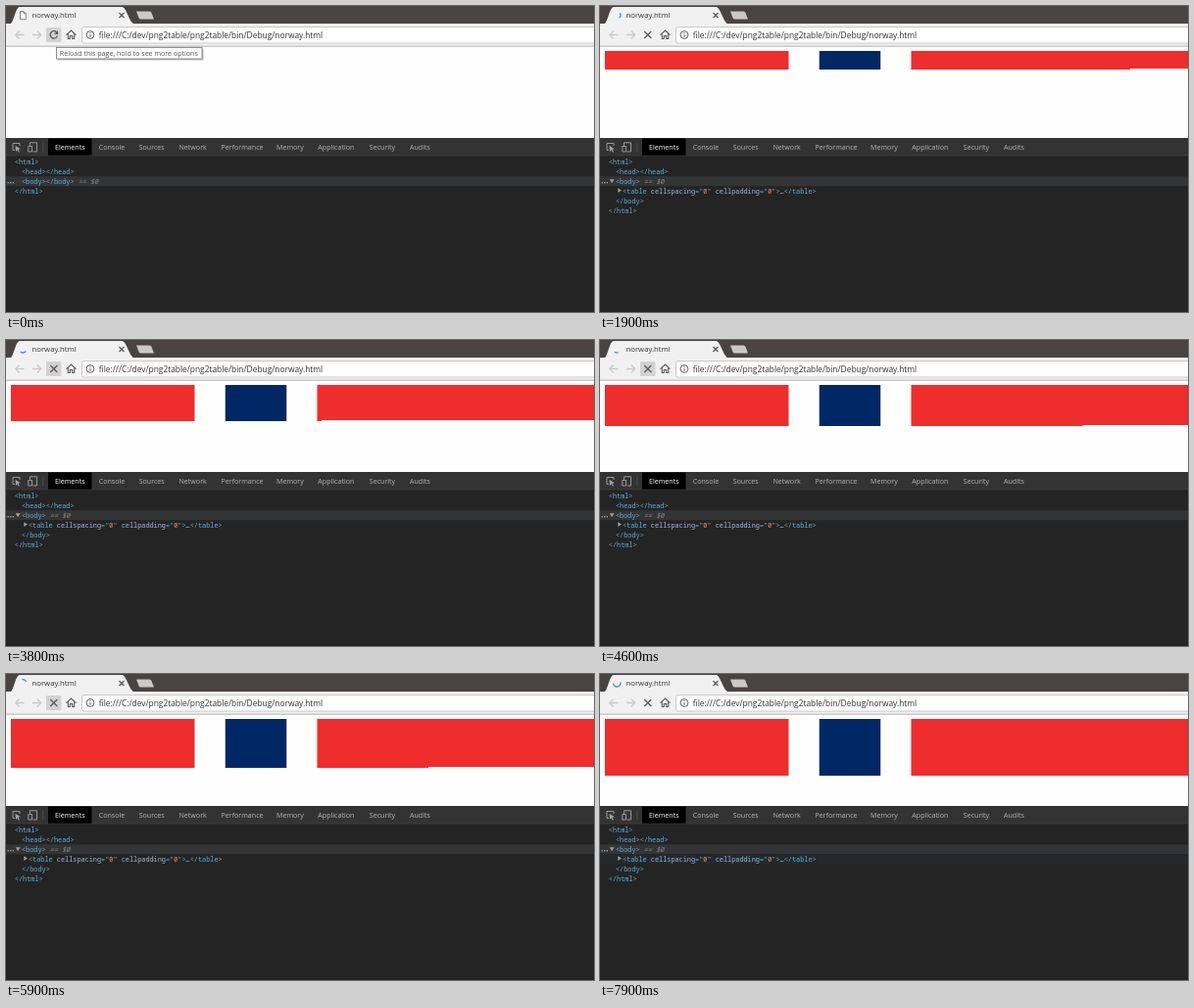
These frames come from a looping animation (600x313 px, 8 s). An HTML page:

```html
<!DOCTYPE html>
<html lang="en">
<head>
<meta charset="utf-8">
<title>Table loading in a browser</title>
<style>
  html, body { margin: 0; width: 100%; height: 100%; overflow: hidden; background: #242424; }
  svg { display: block; width: 100vw; height: 100vh; }
  text { white-space: pre; }
  .ui { font-family: "Open Sans", "Noto Sans", sans-serif; }
  .tabs { font-size: 7.1px; fill: #b4b4b4; }
  .code { font-family: "Noto Sans Mono", "DejaVu Sans Mono", monospace; font-size: 6.875px; fill: #5db0d7; }
  .attr { fill: #9bbbdc; }
  .value { fill: #f28b66; }
  .ref { fill: #8c8c8c; font-style: italic; }
  .line { fill: none; stroke: #5a5a5a; stroke-width: 1.3; }
  .faint { stroke: #cbcbcb; }
  .tool { fill: none; stroke: #a5a5a5; stroke-width: .9; }
</style>
</head>
<body>
<svg viewBox="0 0 600 313" preserveAspectRatio="none">
  <defs>
    <clipPath id="painted"><path id="paintedArea" d=""/></clipPath>
  </defs>

  <!-- Tab strip -->
  <rect width="600" height="19" fill="#494442"/>
  <path d="M4 18.5C8 17.5 9 3 13.500 1H119C123.500 3 126 17.500 131 18.500Z" fill="#f2f1f2"/>
  <path d="M133 5.500H146.500Q148 5.500 148.500 7L151 13.500H137.500Q136 13.500 135.500 12Z" fill="#cbc8c7"/>
  <path d="M115.500 7L120.500 12M120.500 7L115.500 12" class="line" stroke-width="1"/>
  <text class="ui" x="26.500" y="12.200" font-size="7.75" fill="#333">norway.html</text>
  <path id="pageIcon" d="M14.500 5.500H18L20.300 7.800V13.700H14.500ZM18 5.500V7.800H20.300" fill="#fff" stroke="#666" stroke-width=".8"/>
  <path id="spinner" fill="none" stroke-width="1.3"/>

  <!-- Toolbar -->
  <rect y="18" width="600" height="23" fill="#f2f1f2"/>
  <rect y="40.500" width="600" height=".8" fill="#c4c3c4"/>
  <path d="M18.500 29.500H10M13.700 25.500L9.700 29.500L13.700 33.500" class="line faint"/>
  <path d="M27 29.500H35.500M31.800 25.500L35.800 29.500L31.800 33.500" class="line faint"/>
  <rect id="hover" x="41" y="22" width="15.500" height="15" rx="1.500" fill="#d3d2d3"/>
  <g id="reloadIcon">
    <path d="M51.600 26.800A3.700 3.700 0 1 0 52.400 30.500" class="line"/>
    <path d="M53 25V29H49Z" fill="#5a5a5a"/>
  </g>
  <path id="stopIcon" d="M45.300 26L52.300 33M52.300 26L45.300 33" class="line"/>
  <path d="M61.500 29.700L66.500 25L71.500 29.700M63.300 28.500V33.500H65.300V30.500H67.700V33.500H69.700V28.500" class="line" style="stroke-width:1.1"/>
  <rect x="77.500" y="21.500" width="530" height="16.500" rx="2" fill="#fff" stroke="#c6c5c6" stroke-width=".9"/>
  <circle cx="86" cy="29.500" r="3.900" class="line" style="stroke-width:1"/>
  <path d="M86 29V31.700M86 27V28" class="line" style="stroke-width:1"/>
  <text class="ui" x="94.800" y="32.500" font-size="8.4" fill="#333">file:///C:/dev/png2table/png2table/bin/Debug/norway.html</text>

  <!-- Page -->
  <rect y="41.300" width="600" height="94" fill="#fefefe"/>
  <g clip-path="url(#painted)">
    <rect x="5" y="46" width="187.500" height="88" fill="#ee2d2c"/>
    <rect x="223.750" y="46" width="62.500" height="88" fill="#002864"/>
    <rect x="317.500" y="46" width="374.500" height="88" fill="#ee2d2c"/>
  </g>
  <g id="tooltip">
    <rect x="52.500" y="43.500" width="149" height="12" fill="#000" opacity=".25"/>
    <rect x="51.500" y="42.500" width="148.500" height="11.500" fill="#fff" stroke="#777" stroke-width=".8"/>
    <text class="ui" x="54.800" y="51" font-size="7.1" fill="#575757">Reload this page, hold to see more options</text>
  </g>

  <!-- Developer tools -->
  <rect y="135" width="600" height="178" fill="#242424"/>
  <rect y="135" width="600" height="18" fill="#333"/>
  <rect y="152.600" width="600" height=".7" fill="#3f3f3f"/>
  <rect x="43" y="135.500" width="44.500" height="17.200" fill="#000"/>
  <path d="M9 147.500H7V140.500H14V143" class="tool"/>
  <path d="M9.500 142.800L14.800 146.300L12.500 146.800L14 149.300L12.900 149.800L11.600 147.300L10 149Z" fill="#a5a5a5"/>
  <path d="M24.500 143V139.800H31.500V149H27.500M22.800 143.500H26.500V149H22.800Z" class="tool"/>
  <path d="M37.800 139.500V149.500" class="tool" style="stroke:#505050"/>
  <g class="ui tabs">
    <text x="50" y="147.300" fill="#fff">Elements</text>
    <text x="94.700" y="147.300">Console</text>
    <text x="135.700" y="147.300">Sources</text>
    <text x="176.500" y="147.300">Network</text>
    <text x="219.500" y="147.300">Performance</text>
    <text x="276" y="147.300">Memory</text>
    <text x="318.300" y="147.300">Application</text>
    <text x="370.800" y="147.300">Security</text>
    <text x="412" y="147.300">Audits</text>
  </g>

  <!-- Element tree -->
  <rect y="174.300" width="600" height="9.900" fill="#333435"/>
  <rect id="rowHover" y="184.200" width="600" height="10" fill="#23292d"/>
  <g fill="#b5b5b5"><circle cx="2.200" cy="180.700" r=".75"/><circle cx="4.800" cy="180.700" r=".75"/><circle cx="7.400" cy="180.700" r=".75"/></g>
  <g class="code">
    <text x="8.800" y="161.700">&lt;html&gt;</text>
    <text x="16" y="171.700">&lt;head&gt;&lt;/head&gt;</text>
    <g id="emptyTree">
      <text x="16" y="181.700">&lt;body&gt;&lt;/body&gt;<tspan class="ref"> == $0</tspan></text>
      <text x="8.800" y="191.700">&lt;/html&gt;</text>
    </g>
    <g id="tableTree">
      <path d="M9.800 177.300H14.600L12.200 181.300Z" fill="#a0a0a0"/>
      <text x="16" y="181.700">&lt;body&gt;<tspan class="ref"> == $0</tspan></text>
      <path d="M18.300 186.200L22 188.600L18.300 191Z" fill="#a0a0a0"/>
      <text x="23" y="191.700">&lt;table <tspan class="attr">cellspacing</tspan>="<tspan class="value">0</tspan>" <tspan class="attr">cellpadding</tspan>="<tspan class="value">0</tspan>"&gt;<tspan fill="#ddd">…</tspan>&lt;/table&gt;</text>
      <text x="16" y="201.700">&lt;/body&gt;</text>
      <text x="8.800" y="211.700">&lt;/html&gt;</text>
    </g>
  </g>
</svg>
<script>
const LOOP = 8000, STEP = 100;
const CLICK = 900, COMMIT = 1600;
const ARC_TIME = 2000 / 3, MAX_ARC = 270, SPIN_OFFSET = -20;
const TABLE = { x: 5, y: 46, width: 687 };

// [time, rows painted]; each row costs more than the one before it
const PROGRESS = [[1600, 14.1], [1900, 18.78], [2900, 29.46], [4600, 41.71],
                  [5900, 49.62], [6900, 55.15], [7900, 57.92]];

const el = id => document.getElementById(id);
const show = (id, on) => el(id).setAttribute("visibility", on ? "visible" : "hidden");

function rowsAt(t) {
  if (t < COMMIT) return 0;
  const i = Math.max(1, PROGRESS.findIndex(([time]) => time >= t));
  const [t0, r0] = PROGRESS[i - 1], [t1, r1] = PROGRESS[i];
  return Math.sqrt(r0 * r0 + (r1 * r1 - r0 * r0) * (t - t0) / (t1 - t0));
}

// cubic-bezier(.4, 0, .2, 1)
function ease(x) {
  let lo = 0, hi = 1;
  for (let i = 0; i < 24; i++) {
    const s = (lo + hi) / 2, u = 1 - s;
    if (1.2 * u * u * s + 0.6 * u * s * s + s ** 3 < x) lo = s; else hi = s;
  }
  return lo * lo * (3 - 2 * lo);
}

function arc(start, sweep) {
  const cx = 17.3, cy = 9.3, r = 3.7;
  const point = deg => {
    const a = deg * Math.PI / 180;
    return `${(cx + r * Math.cos(a)).toFixed(2)} ${(cy + r * Math.sin(a)).toFixed(2)}`;
  };
  return `M${point(start)}A${r} ${r} 0 ${+(Math.abs(sweep) > 180)} ${+(sweep > 0)} ${point(start + sweep)}`;
}

function drawSpinner(t) {
  const spinner = el("spinner"), elapsed = t - COMMIT;
  if (elapsed < 0) {
    spinner.setAttribute("stroke", "#8a8a8a");
    spinner.setAttribute("d", arc(SPIN_OFFSET - 360 * elapsed / 1320, 179));
    return;
  }
  const phase = elapsed / ARC_TIME, half = Math.floor(phase);
  let sweep = MAX_ARC * ease(phase - half);
  if (half % 2 === 0) sweep -= MAX_ARC;
  if (Math.abs(sweep) < 5) sweep = sweep < 0 ? -5 : 5;
  const start = SPIN_OFFSET + 360 * elapsed / 1568 + Math.floor(half / 2) * MAX_ARC;
  spinner.setAttribute("stroke", "#4087e0");
  spinner.setAttribute("d", arc(start, sweep));
}

function drawTable(t) {
  const { x, y, width } = TABLE;
  const rows = rowsAt(t), full = Math.floor(rows);
  el("paintedArea").setAttribute("d", rows
    ? `M${x} ${y}h${width}v${full}H${x + width * (rows - full)}v1H${x}Z` : "");
}

function draw(t) {
  const clicked = t >= CLICK, loaded = t >= COMMIT;
  show("tooltip", !clicked);
  show("pageIcon", !clicked);
  show("spinner", clicked);
  show("reloadIcon", !loaded);
  show("stopIcon", loaded);
  show("hover", !loaded || (t >= 2200 && t < 7500));
  show("emptyTree", !loaded);
  show("tableTree", loaded);
  show("rowHover", t >= 7800);
  drawSpinner(t);
  drawTable(t);
}

const began = performance.now();
function tick() {
  const t = (performance.now() - began) % LOOP;
  draw(Math.floor(t / STEP) * STEP);
  requestAnimationFrame(tick);
}
tick();
</script>
</body>
</html>
```
